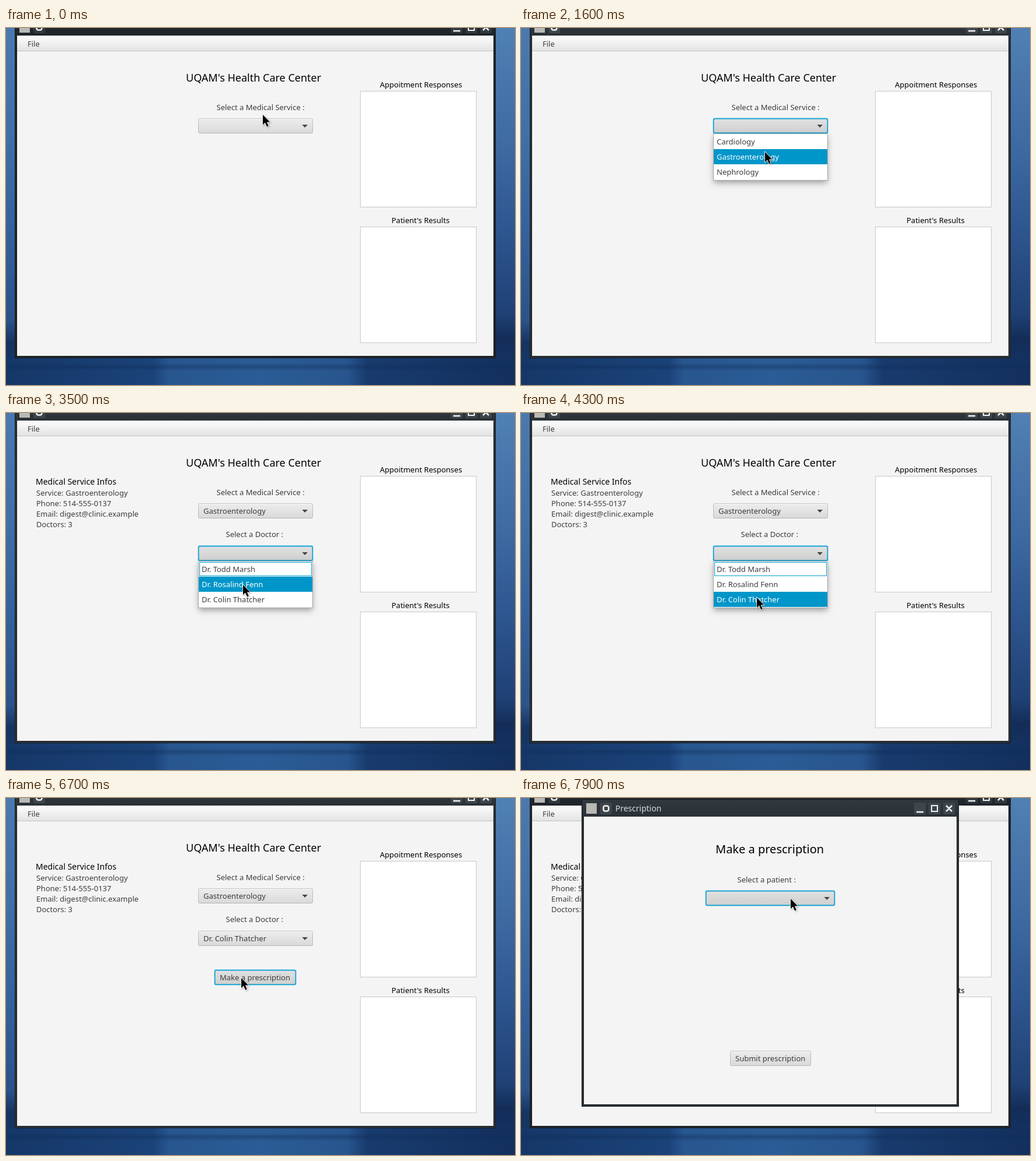
Write an HTML page with a canvas that moves like this. It is 874 by 613 pixels and loops after 8 s.

```html
<!DOCTYPE html>
<html lang="en">
<head>
<meta charset="utf-8">
<title>Health Care Center</title>
<style>
html, body { margin: 0; width: 100%; height: 100%; overflow: hidden; background: #16345f; }
canvas { display: block; }
</style>
</head>
<body>
<canvas id="stage" width="874" height="613"></canvas>
<script>
const ctx = document.getElementById('stage').getContext('2d');
const LOOP = 8000, STEP = 100;
const ACCENT = '#039ed3', DARK = '#3c3c3c';
const SERVICES = ['Cardiology', 'Gastroenterology', 'Nephrology'];
const DOCTORS = ['Dr. Todd Marsh', 'Dr. Rosalind Fenn', 'Dr. Colin Thatcher'];
const INFOS = ['Service: Gastroenterology', 'Phone: 514-555-0137', 'Email: digest@clinic.example', 'Doctors: 3'];
const FILLS = { normal: ['#ededed', '#d9d9d9'], hover: ['#f5f5f5', '#e2e2e2'], armed: ['#e1e1e1', '#cfcfcf'] };

// Pointer path: time, x, y
const PATH = [
  [0, 441, 149], [100, 441, 150], [600, 434, 171], [1000, 434, 171], [1400, 424, 213], [1500, 424, 213],
  [1600, 419, 213], [2000, 419, 213], [2200, 403, 223], [2300, 403, 223], [2400, 410, 225], [2500, 409, 234],
  [2900, 409, 234], [3300, 408, 284], [3500, 407, 295], [3800, 407, 299], [4300, 405, 317],
  [4900, 405, 317], [5400, 404, 309], [7100, 404, 309], [7700, 472, 165], [7800, 472, 165], [7900, 463, 173]
];

const clamp = v => Math.max(0, Math.min(1, v));
const ramp = (t, from, to) => clamp((t - from) / (to - from));
const mix = (a, b, k) => `rgb(${a.map((v, i) => Math.round(v + (b[i] - v) * k))})`;

function pointerAt(t) {
  const next = PATH.findIndex(p => p[0] > t);
  if (next < 0) return PATH[PATH.length - 1].slice(1);
  const [t0, x0, y0] = PATH[next - 1], [t1, x1, y1] = PATH[next], k = (t - t0) / (t1 - t0);
  return [Math.round(x0 + (x1 - x0) * k), Math.round(y0 + (y1 - y0) * k)];
}

function rect(x, y, w, h, fill) {
  ctx.fillStyle = fill;
  ctx.fillRect(x, y, w, h);
}

function round(x, y, w, h, r, fill) {
  ctx.fillStyle = fill;
  ctx.beginPath();
  ctx.roundRect(x, y, w, h, r);
  ctx.fill();
}

function gradient(x0, y0, x1, y1, ...colors) {
  const g = ctx.createLinearGradient(x0, y0, x1, y1);
  colors.forEach((c, i) => Array.isArray(c) ? g.addColorStop(...c) : g.addColorStop(i / (colors.length - 1), c));
  return g;
}

function text(str, x, y, size = 13, color = DARK) {
  ctx.font = `${size}px "Noto Sans", sans-serif`;
  ctx.fillStyle = color;
  ctx.fillText(str, x, y);
}

function desktop() {
  rect(0, 0, 437, 613, gradient(0, 0, 0, 613, '#4b79ae', [.3, '#4070a8'], [.55, '#35639d'], [.82, '#2b5389'], [.88, '#163461'], [1, '#15386b']));
  rect(437, 0, 437, 613, gradient(0, 0, 0, 613, '#5080b4', [.3, '#406ca4'], [.55, '#2f5791'], [.8, '#1f4175'], [.87, '#132d58'], [1, '#15366a']));
  rect(0, 567, 874, 46, gradient(0, 0, 874, 0, '#153768', [.29, '#1b4379'], [.32, '#28568f'], [.5, '#2b5c95'], [.67, '#28558d'], [.71, '#183b6e'], [1, '#132f5d']));
  rect(0, 575, 874, 14, gradient(0, 575, 0, 589, 'rgba(14,44,88,0)', 'rgba(14,44,88,.4)', 'rgba(14,44,88,0)'));
}

// Decorated window around the content area x, y, w, h
function windowFrame(x, y, w, h, focus, title) {
  const right = x + w;
  rect(x - 4, y - 30, w + 8, h + 34, '#15191c');
  rect(x - 3, y - 29, w + 6, h + 32, mix([34, 39, 44], [47, 54, 59], focus));
  rect(x - 3, y - 29, w + 6, 29, gradient(0, y - 29, 0, y, mix([38, 43, 48], [50, 57, 62], focus), mix([31, 36, 41], [42, 49, 54], focus)));
  rect(x - 1, y, w + 2, h + 1, '#15191c');
  rect(x, y, w, h, '#f4f4f4');

  const cy = y - 14;
  rect(x + 4, cy - 9, 18, 18, '#b9b9b5');
  for (const cx of [x + 38, right - 63, right - 38, right - 13])
    round(cx - 10, cy - 10, 20, 20, 2, mix([50, 56, 62], [62, 69, 75], focus));
  ctx.strokeStyle = '#f2f2f2';
  ctx.lineWidth = 2.5;
  ctx.beginPath();
  ctx.roundRect(x + 33.5, cy - 4.5, 9, 9, 3);
  ctx.moveTo(right - 69, cy + 6);
  ctx.lineTo(right - 57, cy + 6);
  ctx.moveTo(right - 18, cy - 5);
  ctx.lineTo(right - 8, cy + 5);
  ctx.moveTo(right - 8, cy - 5);
  ctx.lineTo(right - 18, cy + 5);
  ctx.stroke();
  ctx.lineWidth = 2;
  ctx.strokeRect(right - 43, cy - 5, 10, 10);
  if (title) text(title, x + 54, cy + 5, 14, '#d8dbdd');
}

function control(x, y, w, pointer, { focused, armed } = {}) {
  const [px, py] = pointer, over = px >= x && px < x + w && py >= y && py < y + 26;
  const fill = FILLS[armed ? 'armed' : over ? 'hover' : 'normal'];
  if (focused) {
    round(x - 1, y - 1, w + 2, 28, 4, 'rgba(3,158,211,.3)');
    round(x, y, w, 26, 3, ACCENT);
    round(x + 1.4, y + 1.4, w - 2.8, 23.2, 2, gradient(0, y, 0, y + 26, ...fill));
  } else {
    round(x, y, w, 26, 3, gradient(0, y, 0, y + 26, '#c4c4c4', '#b2b2b2'));
    round(x + 1, y + 1, w - 2, 24, 2, gradient(0, y, 0, y + 26, '#fafafa', '#e4e4e4'));
    round(x + 1, y + 2, w - 2, 23, 2, gradient(0, y, 0, y + 26, ...fill));
  }
}

function combo(x, y, w, value, pointer, state) {
  control(x, y, w, pointer, state);
  if (value) text(value, x + 9, y + 18);
  const ax = x + w - 18.5, ay = y + 11;
  ctx.fillStyle = '#444';
  ctx.beginPath();
  ctx.moveTo(ax, ay);
  ctx.lineTo(ax + 9.5, ay);
  ctx.lineTo(ax + 4.75, ay + 5);
  ctx.fill();
}

function button(x, y, w, label, pointer, state) {
  control(x, y, w, pointer, state);
  text(label, x + 9, y + 18);
}

function dropdown(x, y, items, [px, py], outlined) {
  ctx.save();
  ctx.shadowColor = 'rgba(0,0,0,.35)';
  ctx.shadowBlur = 10;
  ctx.shadowOffsetY = 5;
  rect(x + 1, y, 195, 80, '#fff');
  ctx.restore();
  rect(x, y, 197, 81, '#a9a9a9');
  rect(x + 1, y + 1, 195, 79, '#fff');
  items.forEach((item, i) => {
    const top = y + 1 + i * 26, hover = py >= top && py < top + 26;
    if (hover) rect(x + 1, top, 195, 26, '#0096c9');
    else if (outlined && i === 0) {
      ctx.strokeStyle = ACCENT;
      ctx.lineWidth = 1;
      ctx.strokeRect(x + 2.5, top + 1.5, 192, 23);
    }
    text(item, x + 6, top + 18, 13, hover ? '#fff' : DARK);
  });
}

function listView(title, tx, y) {
  text(title, tx, y - 6, 13, '#000');
  rect(608, y, 200, 200, '#c8c8c8');
  rect(609, y + 1, 198, 198, '#fff');
}

function mainWindow(t, pointer) {
  windowFrame(19, 13, 818, 550, t < 3000 ? ramp(t, 0, 400) : 1 - ramp(t, 6800, 7000));
  rect(19, 13, 818, 27, '#c3c3c3');
  rect(19, 13, 818, 26, gradient(0, 13, 0, 39, '#fdfdfd', '#e3e3e3'));
  text('File', 37, 32);
  text("UQAM's Health Care Center", 309, 92, 18, '#000');
  listView('Appoitment Responses', 642, 108);
  listView("Patient's Results", 662, 341);

  const chosen = t >= 1800, detailed = t >= 1900;
  text('Select a Medical Service :', 361.5, 141);
  combo(330, 155, 197, chosen && SERVICES[1], pointer, { focused: t >= 700 && t < 2700, armed: t >= 700 && !chosen });
  if (detailed) {
    text('Medical Service Infos', 51, 123, 14, '#000');
    INFOS.forEach((line, i) => text(line, 52, 142 + i * 18));
    text('Select a Doctor :', 377.5, 213);
    combo(330, 228, 197, t >= 4700 && DOCTORS[2], pointer, { focused: t >= 2700 && t < 6700, armed: t >= 2700 && t < 4700 });
  }
  if (t >= 4800) {
    const pressed = t >= 6700;
    button(358, 295, 140, 'Make a prescription', pointer, { focused: pressed, armed: pressed });
  }
  if (t >= 900 && !chosen) dropdown(330, 181, SERVICES, pointer, false);
  if (t >= 2900 && t < 4700) dropdown(330, 254, DOCTORS, pointer, true);
}

function prescriptionWindow(t, pointer) {
  if (t < 6900) return;
  const grow = ramp(t, 6800, 7100), rest = (1 - grow) ** 3;
  ctx.save();
  ctx.globalAlpha = 1 - rest;
  ctx.translate(428, 266);
  ctx.scale(1 - .09 * rest, 1 - .09 * rest);
  ctx.translate(-428, -266);
  windowFrame(108, 32, 640, 494, ramp(t, 6800, 7200), 'Prescription');
  text('Make a prescription', 334, 95, 20, '#000');
  text('Select a patient :', 371.5, 145);
  combo(317, 159, 222, '', pointer, { focused: true, armed: t >= 7900 });
  button(359, 434, 139, 'Submit prescription', pointer);
  ctx.restore();
}

function drawPointer([x, y]) {
  const arrow = new Path2D('M0 0V17.2L4 13.6L7 20.4L9.8 19.2L6.9 12.6H12.2Z');
  ctx.save();
  ctx.translate(x, y);
  ctx.shadowColor = 'rgba(0,0,0,.35)';
  ctx.shadowBlur = 3;
  ctx.shadowOffsetX = ctx.shadowOffsetY = 1;
  ctx.strokeStyle = '#fff';
  ctx.lineWidth = 1.6;
  ctx.stroke(arrow);
  ctx.shadowColor = 'transparent';
  ctx.fillStyle = '#000';
  ctx.fill(arrow);
  ctx.restore();
}

function frame(now) {
  const t = Math.floor(now % LOOP / STEP) * STEP, pointer = pointerAt(t);
  desktop();
  mainWindow(t, pointer);
  prescriptionWindow(t, pointer);
  drawPointer(pointer);
  requestAnimationFrame(frame);
}
requestAnimationFrame(frame);
</script>
</body>
</html>
```
